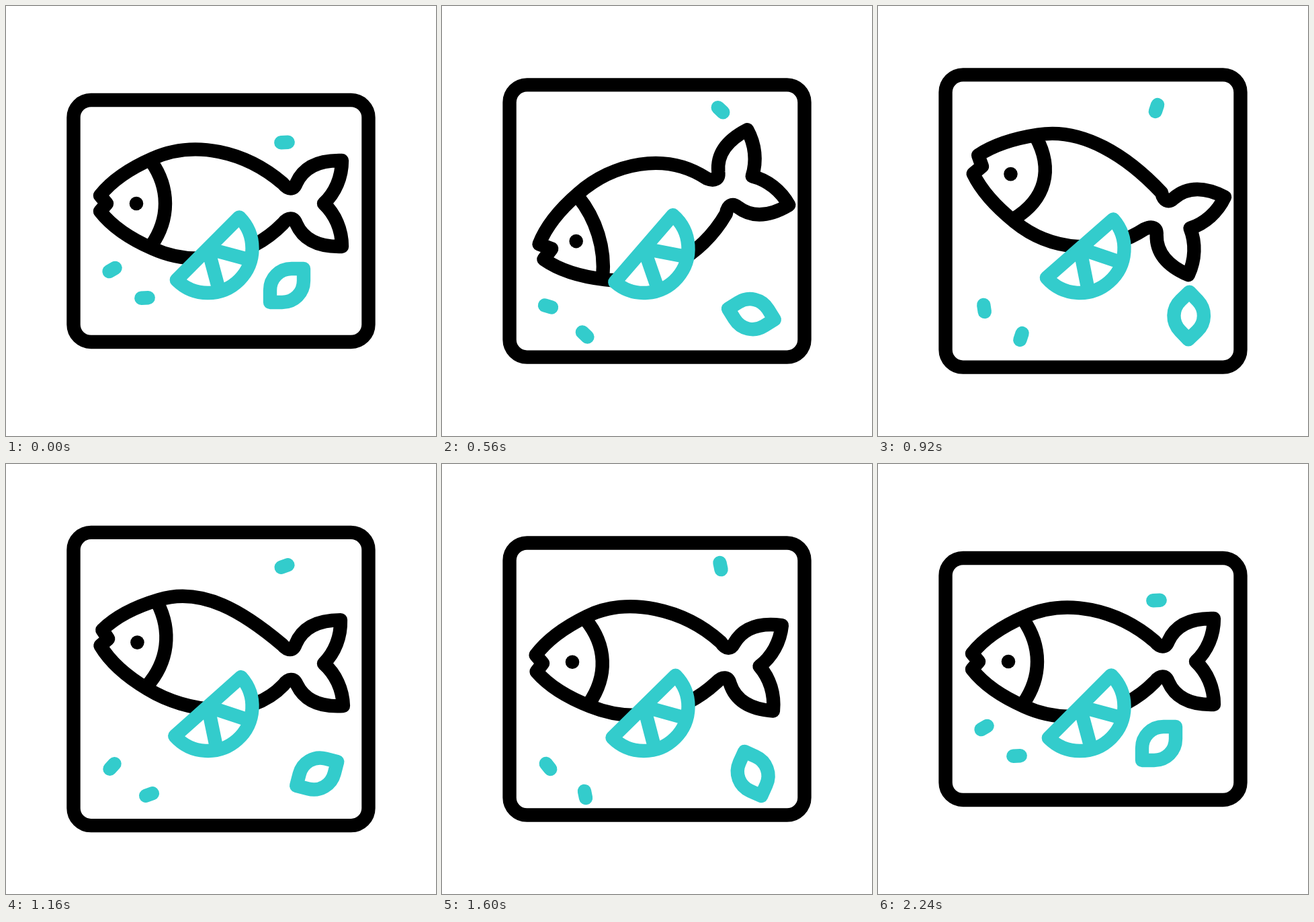
Write an HTML page with a canvas that moves like this. It is 640 px wide and 640 px high and loops after 3000 ms.

```html
<!DOCTYPE html>
<html lang="en">
<head>
<meta charset="utf-8">
<style>
html, body { margin: 0; height: 100%; overflow: hidden; background: #fff; }
canvas { display: block; }
</style>
</head>
<body>
<canvas id="stage" width="640" height="640"></canvas>
<script>
const ctx = document.getElementById('stage').getContext('2d');
const TEAL = '#33cccc', LOOP = 3000, MOVE = 2240, STEP = 40;
const rad = deg => deg * Math.PI / 180;

// Eases from 0 to 1, flat outside
function smooth(u) {
  u = Math.min(Math.max(u, 0), 1);
  return u * u * (3 - 2 * u);
}

// Eases through values that follow each other at a steady beat
function beat(t, ...values) {
  const s = Math.min(Math.max((t - 95) / 435, 0), values.length - 1.001), i = Math.floor(s);
  return values[i] + (values[i + 1] - values[i]) * smooth(s - i);
}

// Tail beat that starts softly
const wag = t => -Math.cos(2 * Math.PI * (t - 550) / 800) * smooth((t - 100) / 300);

// Returns a function that maps local points to the stage
function frame(x, y, deg) {
  const c = Math.cos(rad(deg)), s = Math.sin(rad(deg));
  return (px, py) => [x + px * c - py * s, y + px * s + py * c];
}
const move = p => ctx.moveTo(...p);
const line = p => ctx.lineTo(...p);
const bend = (a, b, c) => ctx.bezierCurveTo(...a, ...b, ...c);

function placed(x, y, deg, draw) {
  ctx.save();
  ctx.translate(x, y);
  ctx.rotate(rad(deg));
  ctx.beginPath();
  draw();
  ctx.stroke();
  ctx.restore();
}

function drawBoard(t) {
  const d = 38.3 * smooth(t / 1000) * (1 - smooth((t - 1120) / 1090));
  ctx.beginPath();
  ctx.roundRect(100.5, 140 - d, 439, 360 + 2 * d, 26);
  ctx.stroke();
}

function drawFish(t) {
  const x = t / MOVE;
  const heave = beat(t, 0, 57.5, -47, -3, 5.5, 0);
  const tilt = beat(t, 0, -17.5, 16, -5, 1, 0);
  const swing = 31 * wag(t) * (1 - x ** 2);
  const lift = 41 * wag(t - 20) * (1 - x ** 4);

  const open = Math.max(0, swing * .1), depth = Math.max(0, -swing * .2);
  const bulge = 50 + .4 * swing;
  const ex = 194 + .0018 * heave ** 2, ey = 294 + heave;
  const head = frame(ex, ey, tilt);
  const tail = frame(473 - .0135 * swing ** 2, 294 + lift, swing);
  const top = tail(-61, -30), low = tail(-61, 30);
  const upper = frame(...top, swing / 4), lower = frame(...low, swing / 2);

  ctx.beginPath();
  move(head(-54, -12 - open));
  bend(head(-35, -36), head(-8, -53), head(24, -67));
  bend(head(86, -95), upper(-56, -48), top);
  bend(tail(-53, -20), tail(-45, -20), tail(-41, -30));
  bend(tail(-30, -55), tail(-6, -65), tail(27, -64));
  bend(tail(27, -39), tail(17, -16), tail(0, 0));
  bend(tail(17, 16), tail(27, 39), tail(27, 64));
  bend(tail(-6, 65), tail(-30, 55), tail(-41, 30));
  bend(tail(-45, 20), tail(-53, 20), low);
  bend(lower(-52, 53), head(86, 95), head(24, 67));
  bend(head(-8, 53), head(-35, 36), head(-54, 11.5 + open));
  line(head(-44 + depth, 0));
  ctx.closePath();
  move(head(22, -63));
  bend(head(bulge, -23), head(bulge, 23), head(22, 63));
  ctx.stroke();

  ctx.beginPath();
  ctx.arc(ex, ey, 10.3, 0, 7);
  ctx.fill();
}

function drawLemon(t) {
  const rock = -4.5 * Math.sin(2 * Math.PI * t / 245) * (1 - (t / MOVE) ** 2);
  placed(300.5, 361, rock - 45, () => {
    ctx.arc(0, 0, 66, 0, Math.PI);
    ctx.closePath();
    ctx.fillStyle = '#fff';
    ctx.fill();
    for (const a of [60, 120]) {
      ctx.moveTo(0, 0);
      ctx.lineTo(66 * Math.cos(rad(a)), 66 * Math.sin(rad(a)));
    }
  });
}

function drawLeaf(t, drift) {
  placed(418 + 44.7 * drift, 416 + 45 * drift, 360 * smooth(t / 2200), () => {
    ctx.moveTo(-25, 25);
    ctx.lineTo(-25, 7);
    ctx.bezierCurveTo(-25, -11, -11, -25, 7, -25);
    ctx.lineTo(25, -25);
    ctx.lineTo(25, -7);
    ctx.bezierCurveTo(25, 11, 11, 25, -7, 25);
    ctx.closePath();
  });
}

function drawPill(x, y, deg) {
  placed(x, y, deg, () => {
    ctx.moveTo(-5.2, 0);
    ctx.lineTo(5.2, 0);
  });
}

function drawPills(t, drift) {
  const x = t / MOVE, spin = 360 * smooth(x * (.9 + .1 * x ** 5));
  drawPill(414.5, 203 - 51 * drift, spin - 3);
  drawPill(158, 392.5 + 57.5 * drift, spin - 30);
  drawPill(206.5 + 6.5 * drift, 434.5 + 57.5 * drift, spin - 3);
}

function render(now) {
  const t = Math.min(Math.floor(now % LOOP / STEP) * STEP, MOVE);
  const drift = smooth(Math.min(t, MOVE - t) / 650);
  ctx.fillStyle = '#fff';
  ctx.fillRect(0, 0, 640, 640);
  ctx.lineWidth = 20.4;
  ctx.lineCap = ctx.lineJoin = 'round';
  ctx.strokeStyle = ctx.fillStyle = '#000';
  drawBoard(t);
  drawFish(t);
  ctx.strokeStyle = TEAL;
  drawLemon(t);
  drawLeaf(t, drift);
  drawPills(t, drift);
  requestAnimationFrame(() => render(performance.now()));
}
render(0);
</script>
</body>
</html>
```
